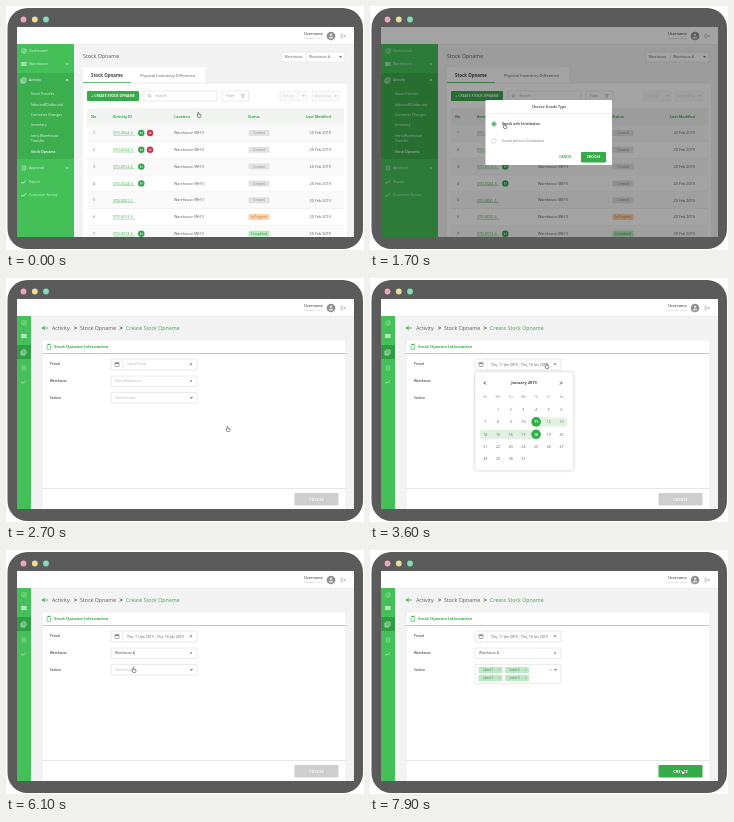
An HTML page with a canvas that plays this animation: 358 by 244 pixels, repeating every 8 s.

```html
<!DOCTYPE html>
<html lang="en">
<head>
<meta charset="utf-8">
<title>Stock opname walkthrough</title>
<style>
html, body { margin: 0; width: 100%; height: 100%; overflow: hidden; background: #fff; }
canvas { display: block; width: 358px; height: 244px; }
</style>
</head>
<body>
<canvas id="stage"></canvas>
<script>
const W = 358, H = 244, LOOP = 8000, STEP = 100;
const GREEN = '#36ac49', SIDE = '#45c058', INK = '#5a5a5a', PALE = '#adadad', LINE = '#dedede';
const canvas = document.getElementById('stage');
const scale = window.devicePixelRatio || 1;
canvas.width = Math.round(W * scale);
canvas.height = Math.round(H * scale);
const screen = canvas.getContext('2d');
const layer = document.createElement('canvas');
layer.width = canvas.width;
layer.height = canvas.height;
const layerCtx = layer.getContext('2d');
let c = screen;

const clamp = v => Math.max(0, Math.min(1, v));
const ramp = (t, from, to) => clamp((t - from) / (to - from));
const ease = v => v * v * (3 - 2 * v);

function rect(x, y, w, h, fill, radius = 0, stroke) {
  c.beginPath();
  c.roundRect(x, y, w, h, radius);
  if (fill) { c.fillStyle = fill; c.fill(); }
  if (stroke) { c.strokeStyle = stroke; c.lineWidth = 0.6; c.stroke(); }
}

function dot(x, y, r, fill, stroke) {
  c.beginPath();
  c.arc(x, y, r, 0, 7);
  if (fill) { c.fillStyle = fill; c.fill(); }
  if (stroke) { c.strokeStyle = stroke; c.lineWidth = 0.7; c.stroke(); }
}

function path(color, width, ...p) {
  c.beginPath();
  for (let i = 0; i < p.length; i += 2) c.lineTo(p[i], p[i + 1]);
  c.strokeStyle = color;
  c.lineWidth = width;
  c.stroke();
}

function text(s, x, y, size = 3.5, color = INK, weight = 400, align = 'left') {
  c.font = `${weight} ${size}px "Open Sans", sans-serif`;
  c.fillStyle = color;
  c.textAlign = align;
  c.textBaseline = 'alphabetic';
  c.fillText(s, x, y + size * 0.36);
}

function caret(x, y, color = '#777') {
  c.beginPath();
  c.moveTo(x - 1.5, y - 0.9);
  c.lineTo(x + 1.5, y - 0.9);
  c.lineTo(x, y + 1);
  c.fillStyle = color;
  c.fill();
}

// dx, dy give the direction in which the chevron points
function chevron(x, y, dx, dy, color, s = 1.5, width = 0.7) {
  path(color, width, x - s * (dx + dy) / 1.4, y - s * (dy + dx) / 1.4,
    x + dx * s / 1.4, y + dy * s / 1.4, x - s * (dx - dy) / 1.4, y - s * (dy - dx) / 1.4);
}

function button(label, x, y, w, h, fill, size = 3.3, color = '#fff') {
  rect(x, y, w, h, fill, 0.8);
  text(label, x + w / 2, y + h / 2, size, color, 700, 'center');
}

function calendarIcon(x, y, color) {
  rect(x - 2, y - 2, 4, 4, null, 0.3, color);
  path(color, 0.9, x - 2, y - 1, x + 2, y - 1);
}

function menuIcon(i, y, color) {
  if (i === 0) {
    rect(16, y - 2, 4, 4, null, 0.5, color);
    path(color, 0.6, 17, y, 18, y + 1, 20, y - 1.5);
  } else if (i === 1) {
    rect(15.5, y - 2, 2, 4, color);
    rect(18.2, y - 1.8, 2.3, 1.5, color);
    rect(18.2, y + 0.4, 2.3, 1.5, color);
  } else if (i === 2) {
    rect(16, y - 2, 4, 4, null, 0.3, color);
    path(color, 0.7, 17, y, 19, y);
    path(color, 0.6, 15, y - 1, 15, y + 3, 19, y + 3);
  } else if (i === 3) {
    rect(16.4, y - 2, 3.2, 4, null, 0.3, color);
    path(color, 0.6, 17.2, y, 18.8, y);
  } else {
    path(color, 0.7, 16, y + 2, 16, y, 18, y + 1, 20, y - 2);
  }
}

function device() {
  rect(0, 0, W, H, '#fff');
  rect(1.5, 2, 355.5, 241, '#5b5b5b', 20);
  dot(17.5, 13.5, 2.9, '#f2a5b4');
  dot(28.8, 13.5, 2.9, '#e9dd94');
  dot(40, 13.5, 2.9, '#7be0b8');
}

function topBar() {
  rect(11, 21, 337, 210, '#f3f3f3');
  rect(11, 21, 337, 17.5, '#fff');
  path('#e5e5e5', 0.6, 11, 38.5, 348, 38.5);
  text('Username', 298, 28, 3.8, INK, 600);
  text('Company Name', 298, 32.5, 2.5, PALE);
  dot(325, 30, 4.3, '#909090');
  dot(325, 28.8, 1.2, '#ddd');
  rect(323, 30.8, 4, 1.7, '#ddd', 0.8);
  path('#999', 0.6, 337, 28.2, 335.2, 28.2, 335.2, 31.8, 337, 31.8);
  path('#999', 0.6, 336.5, 30, 339.5, 30);
  chevron(338.9, 30, 1, 0, '#999', 0.9, 0.6);
}

function wideSidebar() {
  rect(11, 38, 57, 193, SIDE);
  rect(11, 67, 57, 86, '#3cae4d');
  const soft = '#d4f3d9';
  const items = [['Dashboard', 45], ['Warehouse', 58, 1], ['Activity', 74, -1],
    ['Approval', 162, 1], ['Report', 176], ['Customer Survey', 189]];
  items.forEach(([label, y, arrow], i) => {
    const color = i === 2 ? '#fff' : soft;
    menuIcon(Math.min(i, 4), y, color);
    text(label, 23, y, 3.6, color);
    if (arrow) chevron(61, y, 0, arrow, color, 1.3);
  });
  const subs = [['Stock Transfer', 88], ['Inbound/Outbound', 98.5], ['Container Changes', 109],
    ['Inventory', 119], ['Intra-Warehouse', 129.5], ['Transfer', 135]];
  subs.forEach(([label, y]) => text(label, 25, y, 3.5, '#e8f8ea'));
  text('Stock Opname', 25, 146, 3.5, '#fff', 600);
}

function badge(x, y, color) {
  dot(x, y, 3.2, color);
  path('#fff', 0.6, x - 0.8, y - 1.2, x - 0.8, y + 1.2);
  path('#fff', 0.6, x + 0.8, y - 1.2, x + 0.8, y + 1.2);
}

function tableRow(i) {
  const ids = ['0024-6', '0024-3', '0013-6', '0024-6', '0021-1', '0013-6', '0013-6'];
  const y = 127 + i * 16.8;
  rect(81, y - 8, 257, 16.8, i % 2 ? '#fff' : '#fafafa');
  path('#e6e6e6', 0.6, 81, y + 8.6, 338, y + 8.6);
  text(i + 1, 88, y, 3.6, INK, 400, 'center');
  text('STO-' + ids[i], 107, y, 3.7, GREEN);
  path(GREEN, 0.4, 107, y + 2.2, 129, y + 2.2);
  if (i < 4 || i === 6) badge(135.3, y, '#2fa546');
  if (i < 2) badge(144, y, '#d12f45');
  text('Warehouse (WH1)', 168, y, 3.6);
  const [label, fill, color] = i === 5 ? ['In Progress', '#fad2ac', '#c9772f']
    : i === 6 ? ['Completed', '#b7eabd', '#2f9440'] : ['Created', '#e2e2e2', '#8b8b8b'];
  rect(242.5, y - 3, 21, 6, fill, 0.8);
  text(label, 253, y, 3.1, color, 400, 'center');
  text('20 Feb 2019', 325, y, 3.8, INK, 400, 'right');
}

function listPage() {
  topBar();
  text('Stock Opname', 77, 50, 5.3);
  rect(276, 46, 63, 10, '#fff', 0.8, LINE);
  path(LINE, 0.6, 300.5, 46, 300.5, 56);
  text('Warehouse', 278.5, 51, 3.4);
  text('Warehouse A', 303, 51, 3.4);
  caret(334.5, 51);

  rect(77, 61, 122, 17, '#fff', [2, 2, 0, 0]);
  rect(77, 77, 264, 154, '#fff');
  path(LINE, 0.6, 125, 77, 341, 77);
  path(GREEN, 0.8, 77, 76.5, 125, 76.5);
  text('Stock Opname', 85, 69.3, 4.4, '#444', 700);
  text('Physical Inventory Difference', 134, 69.3, 4.1);

  button('+ CREATE STOCK OPNAME', 81, 85, 52, 10, GREEN, 3.45);
  rect(138, 85, 73, 10, '#fff', 0.8, LINE);
  dot(143.3, 89.5, 1.2, null, '#aaa');
  path('#aaa', 0.6, 144.2, 90.4, 145.6, 91.8);
  text('Search', 149.5, 90, 3.6, '#999');
  rect(216, 85, 27, 10, '#fff', 0.8, LINE);
  text('Filter', 220, 90, 3.6, '#999');
  path('#aaa', 0.6, 235, 88.4, 238.6, 88.4, 237.2, 90, 237.2, 91.6, 236.4, 91.6, 236.4, 90, 235, 88.4);
  [['Sort by', 274], ['Ascending', 306]].forEach(([label, x]) => {
    rect(x, 85, 27, 10, '#fafafa', 0.8, '#e9e9e9');
    text(label, x + 3, 90, 3.3, '#cfcfcf');
    caret(x + 23.5, 90, '#cfcfcf');
  });

  c.save();
  c.beginPath();
  c.rect(11, 21, 337, 210);
  c.clip();
  rect(81, 103, 257, 16, '#f2f4f2');
  path('#e6e6e6', 0.6, 81, 103, 338, 103);
  const heads = [['No', 85], ['Activity ID', 107], ['Location', 168], ['Status', 242]];
  heads.forEach(([label, x]) => text(label, x, 111, 3.7, GREEN, 700));
  text('Last Modified', 325, 111, 3.7, GREEN, 700, 'right');
  for (let i = 0; i < 7; i++) tableRow(i);
  c.restore();
  wideSidebar();
}

function goodsModal(t) {
  const shade = ramp(t, 650, 850);
  if (!shade) return;
  rect(11, 21, 337, 210, `rgba(0,0,0,${0.36 * shade})`);
  c.save();
  c.globalAlpha = ramp(t, 600, 825);
  rect(115.5, 94, 126.5, 65, '#fff', 1);
  text('Choose Goods Type', 179, 101, 3.7, '#444', 600, 'center');
  path('#e4e4e4', 0.6, 115.5, 107.5, 242, 107.5);
  const chosen = t >= 1600;
  dot(124, 118, 2.2, '#fff', chosen ? GREEN : '#ccc');
  if (chosen) dot(124, 118, 1.5, GREEN);
  dot(124, 135, 2.2, '#fff', '#ccc');
  text('Goods with Serialization', 132, 118, 3.3, chosen ? '#333' : '#666', chosen ? 600 : 400);
  text('Goods without Serialization', 132, 135, 3.3, '#777');
  text('CANCEL', 195.5, 151.3, 3.2, GREEN, 700, 'center');
  button('CHOOSE', 211, 146, 25, 10.5, GREEN, 3.3);
  c.restore();
}

function field(y, h = 10.5) {
  rect(105, y, 86, h, '#fff', 0.6, LINE);
}

function options(labels, y, picked = 0) {
  rect(105, y, 86, labels.length * 12 + 5, '#fff', 0.6, LINE);
  labels.forEach((label, i) => {
    const cy = y + 7.5 + i * 12;
    if (i < picked) rect(105.4, cy - 6, 85.2, 12, '#e5f5e7');
    text(label, 109, cy, 3.2, i < picked ? GREEN : INK);
  });
}

function calendar(picked) {
  c.save();
  c.shadowColor = 'rgba(0,0,0,.2)';
  c.shadowBlur = 3 * scale;
  rect(105, 94, 98.5, 98.5, '#fff', 0.8);
  c.restore();
  rect(105, 94, 98.5, 98.5, null, 0.8, '#e2e2e2');
  chevron(115, 105, -1, 0, INK, 2);
  chevron(191, 105, 1, 0, INK, 2);
  text('January 2019', 154, 105, 4, '#444', 700, 'center');
  const column = i => 115.3 + i * 12.7;
  ['Su', 'Mo', 'Tu', 'We', 'Th', 'Fr', 'Sa'].forEach((d, i) =>
    text(d, column(i), 118.5, 3.4, '#888', 400, 'center'));
  if (picked === 2) {
    rect(166, 139.5, 31, 9, '#e0f3e3', 1);
    rect(110, 152, 56, 9, '#e0f3e3', 1);
  }
  for (let day = 1; day <= 31; day++) {
    const x = column(day % 7), y = 131.5 + Math.floor(day / 7) * 12.4;
    const end = [11, 18].slice(0, picked).includes(day);
    if (end) dot(x, y, 4.8, '#2fae47');
    text(day, x, y, 3.6, end ? '#fff' : INK, end ? 700 : 400, 'center');
  }
}

function tag(i) {
  const x = 108.5 + (i % 2) * 26.5, y = 117 + (i >> 1) * 8;
  rect(x, y, 24, 6.2, '#bfe8c6', 0.6);
  text('Label ' + (i + 1), x + 4.5, y + 3.1, 3.1, '#3a8b49');
  text('×', x + 20.5, y + 3.1, 3.2, '#3a8b49', 400, 'center');
}

function narrowSidebar() {
  rect(11, 38, 14, 193, SIDE);
  rect(11, 67, 14, 14, '#2f9d43');
  [45, 58, 74, 90, 104].forEach((y, i) => menuIcon(i, y, i === 1 || i === 2 ? '#f2fff4' : '#a9e5b3'));
}

function formPage(t) {
  topBar();
  narrowSidebar();
  path(GREEN, 0.9, 36.5, 50, 42, 50);
  chevron(37.5, 50, -1, 0, GREEN, 2.2, 0.9);
  text('Activity', 46, 50, 5.3);
  chevron(69.5, 50, 1, 0, INK, 1.9, 0.8);
  text('Stock Opname', 74, 50, 5.3);
  chevron(115, 50, 1, 0, INK, 1.9, 0.8);
  text('Create Stock Opname', 120, 50, 5.3, GREEN);

  rect(36, 62, 304, 169, '#fff');
  path('#e5e5e5', 0.6, 36, 231, 36, 62, 340, 62, 340, 231);
  path('#8fd39b', 0.8, 36, 75.5, 340, 75.5);
  rect(41, 66.5, 3.6, 4.8, null, 0.4, GREEN);
  rect(42, 65.8, 1.6, 1.2, GREEN);
  text('Stock Opname Information', 48, 69, 4, GREEN, 700);
  [['Period', 86], ['Warehouse', 103], ['Section', 120]].forEach(([label, y]) =>
    text(label, 44, y, 3.1, '#444', 600));

  const picked = (t >= 3200) + (t >= 3400);
  field(81, 11);
  path(LINE, 0.6, 117, 81, 117, 92);
  calendarIcon(111, 86.5, '#777');
  if (picked === 2) text('Thu, 11 Jan 2019 - Thu, 18 Jan 2019', 121, 86.3, 3.5);
  else text('Select Period', 121, 86.3, 3.2, PALE);
  caret(185, 86.5);

  field(98);
  const hasWarehouse = t >= 5600;
  text(hasWarehouse ? 'Warehouse A' : 'Select Warehouse', 109, 103.3, 3.2, hasWarehouse ? '#444' : PALE);
  caret(185, 103.3);

  const tags = Math.max(0, Math.min(4, Math.floor((t - 6300) / 200)));
  const height = tags > 2 ? 19 : 10.5;
  field(114.5, height);
  for (let i = 0; i < tags; i++) tag(i);
  if (!tags) text('Select Section', 109, 120, 3.2, PALE);
  else text('×', 180.5, 120, 4, '#777', 400, 'center');
  caret(185.5, 120);

  path('#dcdcdc', 0.7, 36, 210.5, 340, 210.5);
  const ready = t >= 7200;
  button('CREATE', 288.5, 215, 44, 12.5, ready ? GREEN : '#cecece', 4, ready ? '#fff' : '#f4f4f4');

  if (t >= 4300 && t < 5600) options(['Warehouse A', 'Warehouse B', 'Warehouse C', 'Warehouse D'], 110);
  if (t >= 6400 && t < 7300) options(['Label 1', 'Label 2', 'Label 3', 'Label 4'], 115.5 + height, tags);
  if (t >= 3000 && t < 3700) calendar(picked);
}

// time, x, y
const route = [
  [100, 193, 109], [400, 112, 91], [700, 112, 91], [1500, 135, 120], [1700, 135, 120],
  [2400, 222, 151], [2700, 222, 151], [2900, 177, 88], [3000, 177, 88], [3200, 166, 146],
  [3300, 166, 158], [3400, 166, 158], [3600, 177, 88], [3800, 177, 88], [4200, 155, 107],
  [4600, 155, 107], [5000, 166, 158], [5100, 166, 158], [5500, 135, 119], [5600, 135, 119],
  [6000, 129, 120], [6100, 128, 120], [6400, 128, 120], [6500, 128, 134], [6700, 128, 146],
  [6900, 128, 166], [7100, 128, 178], [7200, 128, 178], [7500, 229, 174], [7600, 229, 174],
  [7900, 313, 222]
];

function cursor(t) {
  let k = route.findIndex(p => p[0] > t);
  if (k < 0) k = route.length - 1;
  const b = route[k], a = route[Math.max(0, k - 1)];
  const p = k ? ease(ramp(t, a[0], b[0])) : 0;
  c.save();
  c.translate(a[1] + (b[1] - a[1]) * p, a[2] + (b[2] - a[2]) * p);
  c.scale(0.85, 0.85);
  c.beginPath();
  [[-1.2, -3], [-0.3, -3], [0, -0.8], [2.2, -0.3], [2.2, 1.5], [1.5, 3], [-1, 3], [-2.4, 0.6], [-1.2, 0.5]]
    .forEach(([x, y]) => c.lineTo(x, y));
  c.closePath();
  c.fillStyle = '#fff';
  c.fill();
  c.strokeStyle = '#444';
  c.lineWidth = 0.7;
  c.stroke();
  c.restore();
}

function draw(t) {
  screen.setTransform(scale, 0, 0, scale, 0, 0);
  device();
  const swap = ramp(t, 2530, 2630);
  if (swap < 1) {
    listPage();
    goodsModal(t);
  }
  if (swap > 0) {
    c = layerCtx;
    c.setTransform(scale, 0, 0, scale, 0, 0);
    c.clearRect(0, 0, W, H);
    formPage(t);
    c = screen;
    c.globalAlpha = swap;
    c.drawImage(layer, 0, 0, W, H);
    c.globalAlpha = 1;
  }
  cursor(t);
}

const start = performance.now();
function tick() {
  const t = (performance.now() - start) % LOOP;
  draw(Math.floor(t / STEP) * STEP);
  requestAnimationFrame(tick);
}
tick();
</script>
</body>
</html>
```
